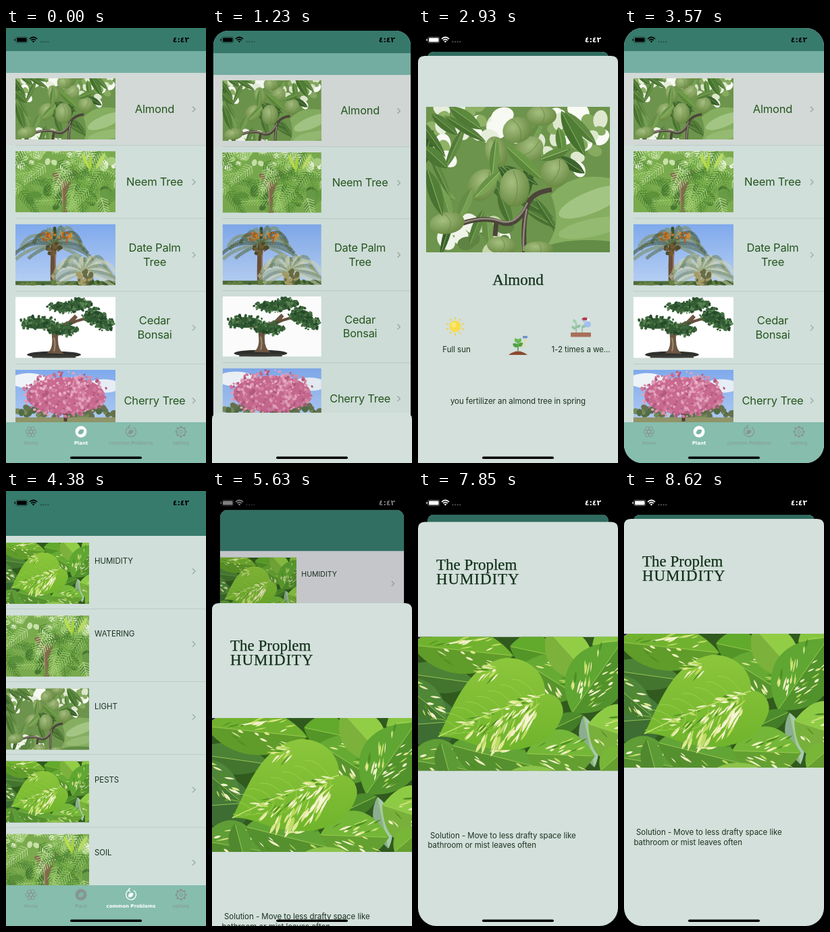
These frames come from a looping animation (296x640 px, 8.72 s). An HTML page:

```html
<!DOCTYPE html>
<html lang="en">
<head>
<meta charset="utf-8">
<title>Plant guide</title>
<style>
  html, body { margin: 0; width: 100%; height: 100%; overflow: hidden; background: #000; }
  svg { display: block; }
  #stage { width: 296px; height: 640px; }
  text { font-family: Inter, Roboto, sans-serif; }
  .name { font-size: 16.5px; letter-spacing: -.2px; fill: #26561f; }
  .note { font-size: 11.5px; letter-spacing: -.05px; fill: #1d3222; }
  .title { font: 23px "Liberation Serif", serif; fill: #12301a; stroke: #12301a; stroke-width: .25px; }
  .tab { font: 7px "DejaVu Sans", sans-serif; }
  .on { font-weight: bold; }
  .time { font: bold 11px "DejaVu Sans", sans-serif; }
  .mid { text-anchor: middle; }
</style>
</head>
<body>
<svg id="stage" viewBox="0 0 296 640"></svg>
<script>
const LOOP = 8720, OPEN = 41, SHUT = 640;

// [start in ms, top edge of the sheet]
const STEPS = [
  [0, SHUT], [1230, 566], [1340, 330], [1450, 140], [1560, 62], [1670, OPEN],
  [3040, 72], [3150, 210], [3250, 420], [3360, 560], [3470, 622], [3570, SHUT],
  [4150, SHUT], [4380, SHUT],
  [5410, 615], [5520, 380], [5630, 165], [5740, 76], [5840, 48], [5950, OPEN],
  [7850, 45.5], [7960, 58], [8070, 78], [8180, 90], [8290, 82], [8400, 60], [8510, 45], [8620, OPEN]
];

const random = seed => () => (seed = seed * 16807 % 2147483647) / 2147483647;
const times = (n, fn) => Array.from({ length: n }, (_, i) => fn(i)).join('');
const rect = (x, y, w, h, fill, rx = 0) =>
  `<rect x="${x}" y="${y}" width="${w}" height="${h}" rx="${rx}" fill="${fill}"/>`;
const oval = (x, y, rx, ry, fill, deg = 0) =>
  `<ellipse rx="${rx}" ry="${ry}" fill="${fill}" transform="translate(${x} ${y}) rotate(${deg})"/>`;
const line = (d, stroke, width = 1, extra = '') =>
  `<path d="${d}" fill="none" stroke="${stroke}" stroke-width="${width}" ${extra}/>`;
const shape = (d, fill) => `<path d="${d}" fill="${fill}"/>`;
const text = (x, y, cls, str, extra = '') => `<text x="${x}" y="${y}" class="${cls}" ${extra}>${str}</text>`;
const at = (x, y, body, deg = 0) => `<g transform="translate(${x} ${y}) rotate(${deg})">${body}</g>`;
const group = (id, body, extra = '') => `<g id="${id}" ${extra}>${body}</g>`;
const leaf = (x, y, len, deg, w, fill) => at(x, y,
  shape(`M0 0C${len * .25} ${-w} ${len * .7} ${-w} ${len} 0C${len * .7} ${w} ${len * .25} ${w} 0 0`, fill), deg);

// Leaf with one shaded half and a rib
const ribbed = (x, y, len, deg, w, fill, rib) => leaf(x, y, len, deg, w, fill) + at(x, y,
  shape(`M0 0C${len * .25} ${w} ${len * .7} ${w} ${len} 0Z`, '#1c3a1030') + line(`M2 0H${len - 3}`, rib, .8), deg);

// Scatter of soft dots inside an ellipse
function spray(seed, n, cx, cy, rx, ry, size, fills) {
  const r = random(seed);
  return times(n, i => {
    const a = r() * 6.283, d = Math.sqrt(r()), s = size * (.6 + r() * .8);
    return oval(cx + Math.cos(a) * d * rx, cy + Math.sin(a) * d * ry, s, s * .75, fills[i % fills.length], r() * 180);
  });
}

function almondPhoto() {
  const r = random(41), greens = ['#4d7836', '#5f8a42', '#76a052', '#3c642d', '#547f3a'];
  const nut = (x, y, rx, ry, deg) => oval(x, y, rx, ry, 'url(#nut)', deg) +
    at(x, y, line(`M${-rx * .1} ${-ry * .9}Q${rx * .5} 0 ${-rx * .1} ${ry * .9}`, '#66863f', .8), deg);
  const leaves = n => times(n, i => ribbed(r() * 240 - 20, r() * 190 - 20, 45 + r() * 35, 25 + r() * 95, 7 + r() * 5, greens[i % 5], '#8fb068'));
  return rect(0, 0, 272, 214, '#6d944c') +
    spray(7, 26, 60, 45, 75, 50, 13, ['#f7faf3', '#e6eedb', '#8fb267']) +
    spray(6, 24, 215, 45, 50, 55, 13, ['#f9fbf5', '#dde8ce', '#86ab60']) +
    spray(9, 16, 85, 190, 60, 22, 12, ['#eff4e8', '#c5d7ac', '#5e8343']) +
    leaves(24) + nut(104, 66, 16, 23, -15) + nut(83, 115, 20, 25, 35) + leaves(6) +
    shape('M185 130Q215 95 272 105V214H170Q205 180 185 130', '#85ae60') +
    oval(245, 140, 52, 16, '#a3c584', -22) + oval(245, 178, 50, 13, '#94ba72', -12) + oval(240, 208, 60, 12, '#638c47') +
    line('M52 172Q85 160 110 170T152 140Q160 125 186 122M150 142Q142 175 146 214M104 168L102 190', '#4c453a', 7) +
    line('M56 170Q86 160 110 168T150 141M149 150Q143 180 144 212', '#948b80', 2.5) +
    nut(171, 13, 22, 15, 0) + nut(151, 64, 19, 24, 55) + nut(135, 34, 22, 19, -20) + nut(191, 97, 21, 22, 25) +
    nut(131, 119, 22, 28, 0) + nut(31, 171, 26, 16, -8) + nut(112, 204, 22, 13, 5) + nut(166, 209, 22, 11, 0) +
    ribbed(118, 58, 74, 42, 12, '#6b9a45', '#a9c97c') + ribbed(200, 6, 75, 62, 14, '#4f7f35', '#9cbb70') +
    ribbed(104, 45, 58, 96, 9, '#6b9a48', '#aac983') + ribbed(196, 30, 42, 80, 10, '#5f9040', '#9cbb70') +
    ribbed(35, 0, 58, 35, 13, '#5b893e', '#9dbb74') + ribbed(-4, 58, 48, 42, 14, '#56833a', '#9dbb74') +
    ribbed(2, 92, 72, 72, 13, '#527f38', '#9ebd73') + ribbed(110, 95, 55, 135, 10, '#7aa653', '#b3cd8c') +
    ribbed(168, 78, 48, -20, 10, '#638f42', '#a9c986');
}

function neemPhoto() {
  const r = random(77), fills = ['#5d963a', '#7fb64f', '#a3cf73', '#4a8132', '#c1df9b'];
  const frond = times(10, i => `M${i * 4} 0l6 ${9 - i * .5}M${i * 4} 0l6 ${i * .5 - 9}`);
  return rect(0, 0, 148, 90, '#79aa4d') + spray(3, 34, 74, 15, 82, 26, 7, ['#c8e1a9', '#a6cd7d', '#e6f0d6']) +
    spray(4, 24, 80, 66, 75, 24, 9, ['#5c8e3d', '#699c46', '#477733']) +
    line('M73 90L71 38M71 62L88 28M72 52L57 32', '#806c4b', 7) + line('M70 88L69 44', '#a28b68', 2) +
    times(56, i => at(r() * 160 - 10, r() * 80 - 8, line('M0 0H42' + frond, fills[i % 5], .9), r() * 180)) +
    leaf(98, 2, 28, 65, 3, '#b8dd4a') + leaf(112, 4, 27, 95, 3, '#a9d33f') + leaf(133, 2, 28, 120, 4, '#b9da65');
}

function palmPhoto() {
  const crown = (x, y, size, n, fills, seed) => {
    const r = random(seed);
    return times(n, i => {
      const a = Math.PI * (1.28 * i / (n - 1) + .86), len = size * (.75 + r() * .4);
      const ex = x + Math.cos(a) * len, ey = y + Math.sin(a) * len * .45 + len * .3;
      return line(`M${x} ${y}Q${x + Math.cos(a) * len * .65} ${y + Math.sin(a) * len * .72 - 5} ${ex} ${ey}`,
        fills[i % fills.length], 5, 'stroke-dasharray="1 .8"');
    });
  };
  return rect(0, 0, 148, 90, 'url(#sky)') + line('M57 32Q55 60 56 90', '#68503a', 8) + line('M59 42V90', '#98765a', 2) +
    crown(58, 30, 58, 17, ['#566839', '#7d8c52', '#3b4d2c'], 5) +
    spray(8, 26, 46, 17, 13, 8, 2, ['#c47a28', '#a95b20']) + spray(6, 24, 74, 19, 10, 9, 2, ['#d08c34', '#a65f24']) +
    spray(2, 25, 57, 36, 10, 10, 3, ['#4f4a2e', '#735a30']) +
    rect(0, 84, 148, 6, '#4d6c36') + spray(12, 28, 74, 87, 75, 4, 4, ['#3b5a2d', '#668044']) +
    crown(103, 70, 54, 23, ['#a7b48a', '#d2d6b4', '#6c8157'], 16) + spray(18, 18, 103, 80, 11, 10, 4, ['#6b6c43', '#a49c66']);
}

function cedarPhoto() {
  const clump = (seed, x, y, rx, ry) => oval(x, y, rx * .86, ry * .72, '#335b34') +
    spray(seed, 70, x, y, rx, ry, 2.1, ['#24492a', '#3f6a3d', '#5a8452', '#315a32']);
  return rect(0, 0, 148, 90, '#fff') + oval(57, 85, 40, 5, '#2e302d') + rect(25, 86, 64, 4, '#3c3d38') +
    shape('M46 83Q56 78 54 59Q51 45 78 36L88 26 92 30 82 42Q61 49 63 64Q63 78 72 84Z', '#6d5743') +
    line('M80 40Q100 30 121 31M58 55Q48 42 29 39', '#66513e', 4) + line('M57 80Q60 70 57 60', '#a08a72', 2) +
    clump(21, 77, 15, 30, 9) + clump(22, 95, 11, 18, 9) + clump(23, 34, 39, 29, 11) + clump(24, 71, 48, 23, 10) +
    clump(25, 116, 29, 18, 13) + clump(26, 132, 40, 14, 10);
}

function cherryPhoto() {
  const pinks = ['#c8698f', '#dc8eac', '#b25a80', '#e2a0ba', '#cf7b9c'];
  return rect(0, 0, 148, 90, 'url(#sky)') + oval(20, 16, 28, 11, '#eef3f8') + oval(130, 24, 26, 10, '#e6edf4') +
    spray(31, 40, 74, 62, 80, 10, 6, ['#526c45', '#768a58', '#65724f']) + rect(0, 70, 148, 20, '#8f9468') +
    rect(0, 78, 148, 4, '#a9a49a') + line('M74 76V54M74 66L58 48M74 64L92 48', '#513d37', 5) +
    oval(74, 38, 58, 27, pinks[0]) + spray(32, 300, 74, 36, 65, 33, 2.4, pinks) + spray(34, 60, 74, 20, 42, 18, 2, ['#eab3c8', '#d47c9e']);
}

function pothosPhoto() {
  const r = random(58), tints = ['#f0f0c0', '#dfe88e', '#bcdc62', '#f6f4d4', '#4f8f22'];
  // Thin streaks that fan out from a rib of the given length
  const streaks = (n, x, y, len, deg, w) => at(x, y, times(n, i => {
    const side = r() < .5 ? -1 : 1;
    return leaf(r() * len, side * r() * w, 7 + r() * 15, side * (12 + r() * 22), .8 + r() * 1.7, tints[i % 5]);
  }), deg);
  const blade = (x, y, len, deg, w, fill, n = 0) =>
    ribbed(x, y, len, deg, w, fill, '#a3cf57') + streaks(n, x + Math.cos(deg / 57.3) * len * .15, y + Math.sin(deg / 57.3) * len * .15, len * .65, deg, w * .4);
  return rect(0, 0, 296, 197, '#315a1e') + shape('M0 0H22L0 14Z', '#3c1a62') +
    blade(-30, 52, 118, 8, 30, '#4c8236') + blade(-20, 130, 85, -4, 52, '#45793a') + blade(-30, 62, 95, 40, 34, '#4f8639', 22) +
    blade(136, 14, 72, 12, 34, '#61aa2c') + blade(158, 38, 92, 32, 48, '#66aa34', 16) +
    blade(192, -10, 96, 48, 42, '#92cd46') + blade(258, 12, 50, -10, 34, '#86c540') + blade(250, 42, 62, -32, 24, '#9ad04e') +
    blade(-10, 12, 152, 6, 46, '#70b22f', 26) + blade(228, 112, 128, -55, 58, '#5fa632', 44) +
    blade(190, 140, 60, -25, 20, '#4c8c2c') + blade(245, 116, 78, 78, 18, '#a5c9ae') + blade(252, 128, 82, 18, 56, '#8ecb45', 16) +
    blade(-16, 180, 92, 10, 50, '#5f9d36', 10) + blade(34, 155, 60, 75, 22, '#5b9a35') +
    blade(50, 160, 126, 14, 48, '#62a436', 14) + blade(160, 172, 102, 2, 50, '#74b738', 26) +
    blade(130, 202, 70, -5, 12, '#8bc34a') + blade(270, 197, 50, -40, 26, '#78b638') +
    shape('M30 147C50 110 70 40 130 31C165 30 190 55 188 84C205 82 218 100 214 115C200 160 150 175 95 162C70 155 50 145 30 147Z', 'url(#fresh)') +
    times(8, i => line(`M${176 - i * 17} ${89 + i * 6.3}q-20 ${-30 + i * 2} -38 ${-26 + i * 2}M${176 - i * 17} ${89 + i * 6.3}q0 ${38 - i * 3} -26 ${50 - i * 6}`, '#a2d255', .8)) +
    streaks(60, 182, 90, 118, 157, 10) + at(176, 104, times(34, i =>
      leaf(r() * 95, r() * -26, 12 + r() * 16, -28 - r() * 20, 1 + r() * 2.6, tints[i % 4])), 157) +
    streaks(18, 124, 44, 34, 160, 8) + line('M188 84Q110 108 30 147', '#bfe070', 1.6);
}

const photo = (id, x, y, w, h) => `<use href="#${id}" x="${x}" y="${y}" width="${w}" height="${h}"/>`;
const symbol = (id, w, h, body) => `<symbol id="${id}" viewBox="0 0 ${w} ${h}" preserveAspectRatio="xMidYMid slice">${body}</symbol>`;
const stops = (a, b) => `<stop stop-color="${a}"/><stop offset="1" stop-color="${b}"/>`;
const gradient = (id, a, b) => `<linearGradient id="${id}" x2="0" y2="1">${stops(a, b)}</linearGradient>`;
const chevron = y => line(`M276 ${y - 4}l4 4-4 4`, '#97a8a1', 1.3);

function tabBar(active) {
  const icons = [
    c => times(7, i => {
      const a = i * Math.PI / 3, d = i < 6 ? 5.4 : 0;
      return `<circle cx="${Math.cos(a) * d}" cy="${Math.sin(a) * d}" r="2.6" fill="none" stroke="${c}"/>`;
    }),
    c => `<circle r="8.5" fill="${c}"/>` + leaf(-4, 3, 10, -35, 4.5, '#7db5a4'),
    c => line('M-3 -7A7.5 7.5 0 1 0 4 -6.5M-1 -10L-4 -7-1 -4', c, 1.3) + leaf(-4, 3, 9, -35, 3.8, c),
    c => line('M0 -8.4V-6M0 6V8.4M-8.4 0H-6M6 0H8.4M-6 -6L-4.3 -4.3M4.3 4.3L6 6M6 -6L4.3 -4.3M-4.3 4.3L-6 6', c, 3) +
      `<circle r="6.2" fill="none" stroke="${c}" stroke-width="1.2"/><circle r="2.4" fill="none" stroke="${c}"/>`
  ];
  return rect(0, 580, 296, 60, '#86bdad') + ['Home', 'Plant', 'common Problems', 'setting'].map((label, i) => {
    const on = i === active, x = 37 + i * 74, color = on ? '#fff' : '#87968f';
    return at(x, 594, icons[i](color)) + text(x, 613, on ? 'tab mid on' : 'tab mid', label, `fill="${color}"`);
  }).join('');
}

function plantList() {
  const rows = [['almond', 'Almond'], ['neem', 'Neem Tree'], ['palm', 'Date Palm', 'Tree'], ['cedar', 'Cedar', 'Bonsai'], ['cherry', 'Cherry Tree']];
  return rect(0, 0, 296, 640, '#d0dfda') + rect(0, 0, 296, 34, '#377b6d') + rect(0, 34, 296, 32, '#75afa3') +
    group('plantPick', rect(0, 66, 296, 106.5, '#d2d9d6')) +
    rows.map(([id, ...words], i) => {
      const y = 74 + i * 107.2;
      return photo(id, 14, y, 148, 90) + rect(14, y + 98.5, 282, .7, '#b3c4be') + chevron(y + 45.5) +
        words.map((w, k) => text(220, y + 51 + (words.length > 1 ? k * 21 - 10.5 : 0), 'name mid', w)).join('');
    }).join('') + tabBar(1);
}

function problemList() {
  const rows = [['pothos', 'HUMIDITY'], ['neem', 'WATERING'], ['almond', 'LIGHT'], ['pothos', 'PESTS'], ['neem', 'SOIL']];
  return rect(0, 0, 296, 640, '#d0dfda') + rect(0, 0, 296, 66, '#377b6d') +
    group('problemPick', rect(0, 66, 296, 106.5, '#dadce0')) +
    rows.map(([id, label], i) => {
      const y = 76 + i * 107.2;
      return photo(id, 0, y, 123, 90) + rect(0, y + 97, 296, .7, '#b3c4be') + text(131, y + 31, 'note', label) + chevron(y + 42);
    }).join('') + tabBar(2);
}

const sheetBack = shape('M0 10Q0 0 10 0H286Q296 0 296 10V640H0Z', '#d3e0db');

function almondSheet() {
  const sun = times(10, i => at(55, 398, line('M0 -10.5V-13.5', '#f0d04a', 2), i * 36)) +
    '<circle cx="55" cy="398" r="8.5" fill="#f8dc48"/>' + oval(53, 396, 4, 4, '#fbe770');
  const sprout = shape('M134 440Q148 429 162 440Z', '#8a4b2f') + line('M148 434V419', '#4b9440', 1.5) +
    leaf(148, 428, 9, -150, 4, '#4fa344') + leaf(148, 427, 9, -30, 4, '#4fa344') +
    leaf(148, 422, 8, -125, 3.5, '#67b951') + leaf(148, 422, 8, -55, 3.5, '#67b951') +
    line('M159 416L154 429', '#ecd992', 2) + rect(155, 412, 7, 3.5, '#6f8fc9', 1);
  const can = rect(226, 407, 30, 6.5, '#a8705a', 1) + line('M234 407V392M243 407V397', '#7fb591', 1.2) +
    leaf(234, 402, 8, -150, 3, '#8fc4a0') + leaf(234, 400, 8, -30, 3, '#8fc4a0') +
    leaf(234, 393, 7, -130, 3, '#a1cfae') + leaf(243, 400, 7, -40, 3, '#8fc4a0') +
    oval(251, 395, 5, 4.5, '#a3bff0') + line('M247 392L242 387', '#a3bff0', 2) + oval(247, 387, 4, 2.2, '#b53a4c') + oval(252, 388, 2, 2, '#f4f4f4');
  return sheetBack + photo('almond', 12, 75, 272, 214) + text(148, 337, 'title mid', 'Almond') + sun + sprout + can +
    text(57, 436, 'note mid', 'Full sun') + text(241, 436, 'note mid', '1-2 times a we...') +
    text(148, 512, 'note mid', 'you fertilizer an almond tree in spring');
}

const humiditySheet = () => sheetBack + text(27, 70, 'title', 'The Proplem') +
  text(27, 91, 'title', 'HUMIDITY', 'letter-spacing=".9"') + photo('pothos', 0, 169, 296, 197) +
  text(18, 465, 'note', 'Solution - Move to less drafty space like') + text(14.5, 479.5, 'note', 'bathroom or mist leaves often');

const statusBar = () => '<rect x="14.5" y="13.2" width="17.5" height="8.6" rx="2.4" fill="none" stroke="currentColor" stroke-width=".8" opacity=".4"/>' +
  rect(16, 14.6, 14.6, 5.8, 'currentColor', 1.2) + rect(12.4, 16, 1.2, 3, 'currentColor', .6) +
  line('M35 16.2Q40.5 10.8 46 16.2M37.2 18.2Q40.5 15 43.8 18.2', 'currentColor', 1.7) +
  shape('M38.7 19.7Q40.5 18 42.3 19.7L40.5 21.6Z', 'currentColor') +
  times(4, i => `<circle cx="${51.5 + i * 3.6}" cy="20.3" r="1.1" fill="currentColor" opacity=".35"/>`) +
  text(259, 21, 'time mid', '٤:٤٢', 'fill="currentColor"');

const clip = id => `<clipPath id="${id}"><rect width="296" height="640"/></clipPath>`;

document.getElementById('stage').innerHTML =
  `<defs>${gradient('sky', '#7fa9ec', '#b8d0f3')}${gradient('fresh', '#8cc63c', '#70b42c')}` +
  `<radialGradient id="nut" cx=".4" cy=".35" r=".7">${stops('#a6bf80', '#66873f')}</radialGradient>` +
  clip('screenClip') + clip('cardClip') +
  symbol('almond', 272, 214, almondPhoto()) + symbol('neem', 148, 90, neemPhoto()) + symbol('palm', 148, 90, palmPhoto()) +
  symbol('cedar', 148, 90, cedarPhoto()) + symbol('cherry', 148, 90, cherryPhoto()) + symbol('pothos', 296, 197, pothosPhoto()) + '</defs>' +
  group('screen', rect(0, 0, 296, 640, '#000') +
    group('card', group('plants', plantList()) + group('problems', problemList()) +
      '<rect id="dim" width="296" height="640"/>', 'clip-path="url(#cardClip)"') +
    group('almondInfo', almondSheet()) + group('humidityInfo', humiditySheet()) +
    group('status', statusBar()) + rect(95, 630.5, 106, 3.6, '#000', 1.8), 'clip-path="url(#screenClip)"');

const $ = id => document.getElementById(id);
const show = (id, on) => $(id).setAttribute('display', on ? 'inline' : 'none');
const round = (id, r) => $(id).firstChild.setAttribute('rx', r);

function pose(t, top) {
  const p = (SHUT - top) / (SHUT - OPEN), scale = 1 - .095 * Math.min(1, p * 1.06);
  const second = t >= 4380;
  show('plants', !second);
  show('problems', second);
  show('plantPick', t < 4150);
  show('problemPick', t >= 5410);
  show('almondInfo', p > 0 && !second);
  show('humidityInfo', p > 0 && second);
  for (const id of ['almondInfo', 'humidityInfo']) $(id).setAttribute('transform', `translate(0 ${top})`);
  $('card').setAttribute('transform', `translate(148 ${320 + 4.5 * p ** 3}) scale(${scale}) translate(-148 -320)`);
  round('cardClip', p > 0 ? 24 - 14 * p : 0);
  round('screenClip', t >= 3040 && t < 4150 || t >= 7850 ? 27 : 0);
  $('dim').setAttribute('opacity', .13 * p);
  const v = Math.round(255 * p ** 3);
  $('status').setAttribute('color', `rgb(${v},${v},${v})`);
}

let shown;
function tick(now) {
  const t = now % LOOP, step = STEPS.findLast(s => s[0] <= t);
  if (step !== shown) pose(...(shown = step));
  requestAnimationFrame(tick);
}
pose(...STEPS[0]);
requestAnimationFrame(tick);
</script>
</body>
</html>
```
